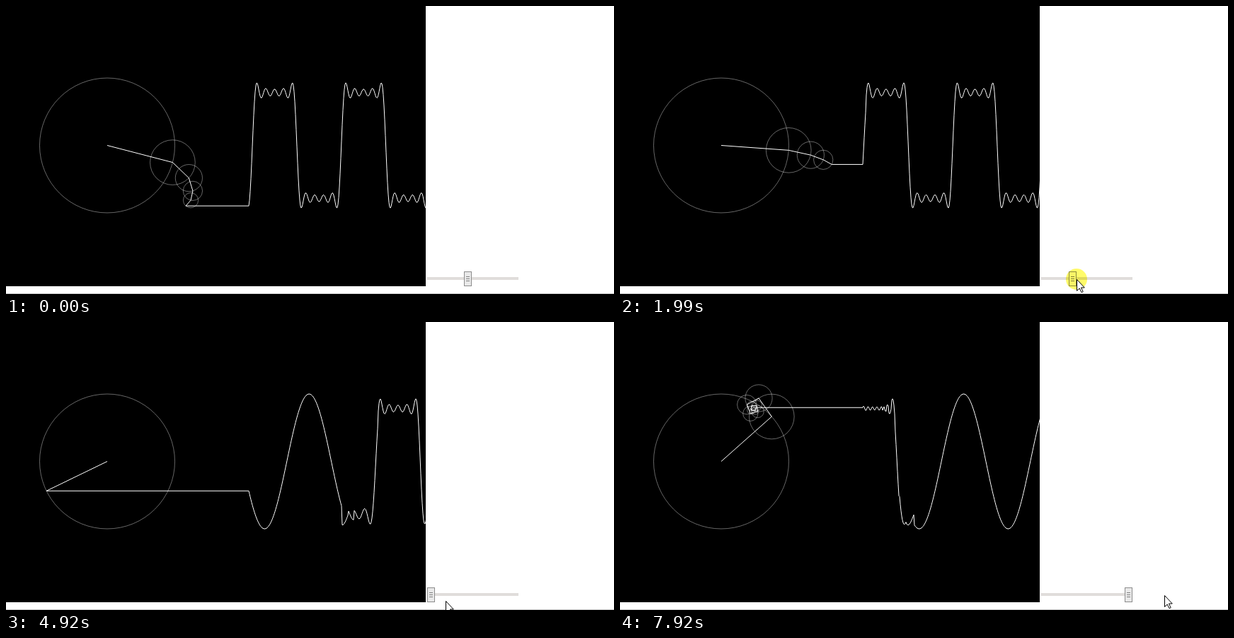
Write an HTML page with a canvas that moves like this. It is 859 px wide and 408 px high and loops after 8 s.

```html
<!DOCTYPE html>
<html lang="en">
<head>
<meta charset="utf-8">
<title>Fourier series</title>
<style>
  html, body { margin: 0; width: 100%; height: 100%; overflow: hidden; background: #fff; }
  canvas { display: block; }
</style>
</head>
<body>
<canvas id="stage" width="859" height="408"></canvas>
<script>
const ctx = document.getElementById('stage').getContext('2d');
const LOOP = 8000;
const TICKS = 104;
const TICK_LEAD = 24;
const SAMPLES_PER_TICK = 4.69;
const VIEW = { w: 593, h: 397 };
const CENTER = { x: 143, y: 197.5 };
const WAVE_X = 343;
const RADIUS = 75 * 4 / Math.PI;
const STEP = 0.05;
const PHASE = 0.255;

// Key points in wave samples: slider value, then pointer position.
const sliderKeys = [[101, 5], [151, 3.5], [173, 1], [405, 1], [432, 3.5], [443, 5.5], [457, 10]];
const pointerKeys = [
  [46, 645, 409], [73, 655, 385], [104, 655, 385], [122, 645, 387], [169, 609, 387],
  [225, 609, 386], [256, 625, 400], [300, 621, 395], [312, 611, 392],
  [405, 609, 387], [443, 668, 387], [457, 738, 387], [483, 769, 387]
];
const presses = [[112, 183], [396, 466]];

function interpolate(keys, s) {
  const next = keys.findIndex(key => key[0] > s);
  if (next === 0) return keys[0].slice(1);
  if (next < 0) return keys.at(-1).slice(1);
  const [a, b] = [keys[next - 1], keys[next]];
  const f = (s - a[0]) / (b[0] - a[0]);
  return a.slice(1).map((v, i) => v + (b[i + 1] - v) * f);
}

const termCount = sample => Math.round(interpolate(sliderKeys, sample)[0]);

// Joints of the circle chain, from the centre to the tip.
function chain(sample) {
  const angle = PHASE + STEP * sample;
  let { x, y } = CENTER;
  const joints = [{ x, y }];
  for (let i = 0, n = termCount(sample); i < n; i++) {
    const k = 2 * i + 1;
    x += RADIUS / k * Math.cos(k * angle);
    y += RADIUS / k * Math.sin(k * angle);
    joints.push({ x, y });
  }
  return joints;
}

function box(color, x, y, w, h) {
  ctx.fillStyle = color;
  ctx.fillRect(x, y, w, h);
}

function drawSeries(sample) {
  ctx.save();
  ctx.beginPath();
  ctx.rect(0, 0, VIEW.w, VIEW.h);
  ctx.clip();
  box('#000', 0, 0, VIEW.w, VIEW.h);
  ctx.lineWidth = 1;
  ctx.lineJoin = 'round';

  const joints = chain(sample);
  ctx.strokeStyle = 'rgba(255,255,255,0.4)';
  joints.slice(0, -1).forEach(({ x, y }, i) => {
    ctx.beginPath();
    ctx.arc(x, y, RADIUS / (2 * i + 1), 0, 2 * Math.PI);
    ctx.stroke();
  });

  ctx.strokeStyle = '#fff';
  ctx.beginPath();
  for (const { x, y } of joints) ctx.lineTo(x, y);
  for (let i = 0; i <= VIEW.w - WAVE_X + 1; i++) {
    ctx.lineTo(WAVE_X + i, chain(sample - i).at(-1).y);
  }
  ctx.stroke();
  ctx.restore();
}

function drawSlider(value, pointer, pressed) {
  box('#e0dddb', 595, 384, 129, 4);
  const left = Math.round(595 + (value - 1) * 13.1);
  const hover = pointer.x >= left && pointer.x < left + 11 && pointer.y < 397;
  box(hover || pressed ? '#f8f8f8' : '#e9e9e9', left, 376, 11, 21);
  ctx.strokeStyle = '#8c8c8c';
  ctx.lineWidth = 1;
  ctx.strokeRect(left + 0.5, 376.5, 10, 20);
  for (const y of [383, 386, 389]) box('#808080', left + 3, y, 5, 1);
}

function drawHighlight({ x, y }) {
  ctx.save();
  ctx.globalCompositeOperation = 'multiply';
  ctx.fillStyle = '#fffb6a';
  ctx.beginPath();
  ctx.arc(x, y, 15, 0, 2 * Math.PI);
  ctx.fill();
  ctx.restore();
}

const arrow = new Path2D('M.5 .5V16.5L4.2 13L7 18.7L9.2 17.7L6.5 12H11.3Z');
function drawPointer({ x, y }) {
  ctx.save();
  ctx.translate(x, y);
  ctx.fillStyle = '#fff';
  ctx.strokeStyle = '#000';
  ctx.lineWidth = 1;
  ctx.fill(arrow);
  ctx.stroke(arrow);
  ctx.restore();
}

function render(time) {
  const tick = Math.min(TICKS - 1, Math.floor((time + TICK_LEAD) * TICKS / LOOP));
  const sample = Math.floor(tick * SAMPLES_PER_TICK + 0.1);
  const [x, y] = interpolate(pointerKeys, sample).map(Math.round);
  const pointer = { x, y };
  const pressed = presses.some(([down, up]) => sample >= down && sample < up);

  box('#fff', 0, 0, 859, 408);
  drawSeries(sample);
  box('#c4c4c4', 0, 407, 859, 1);
  drawSlider(termCount(sample), pointer, pressed);
  if (pressed) drawHighlight(pointer);
  drawPointer(pointer);
}

const start = performance.now();
function loop() {
  render((performance.now() - start) % LOOP);
  requestAnimationFrame(loop);
}
loop();
</script>
</body>
</html>
```
